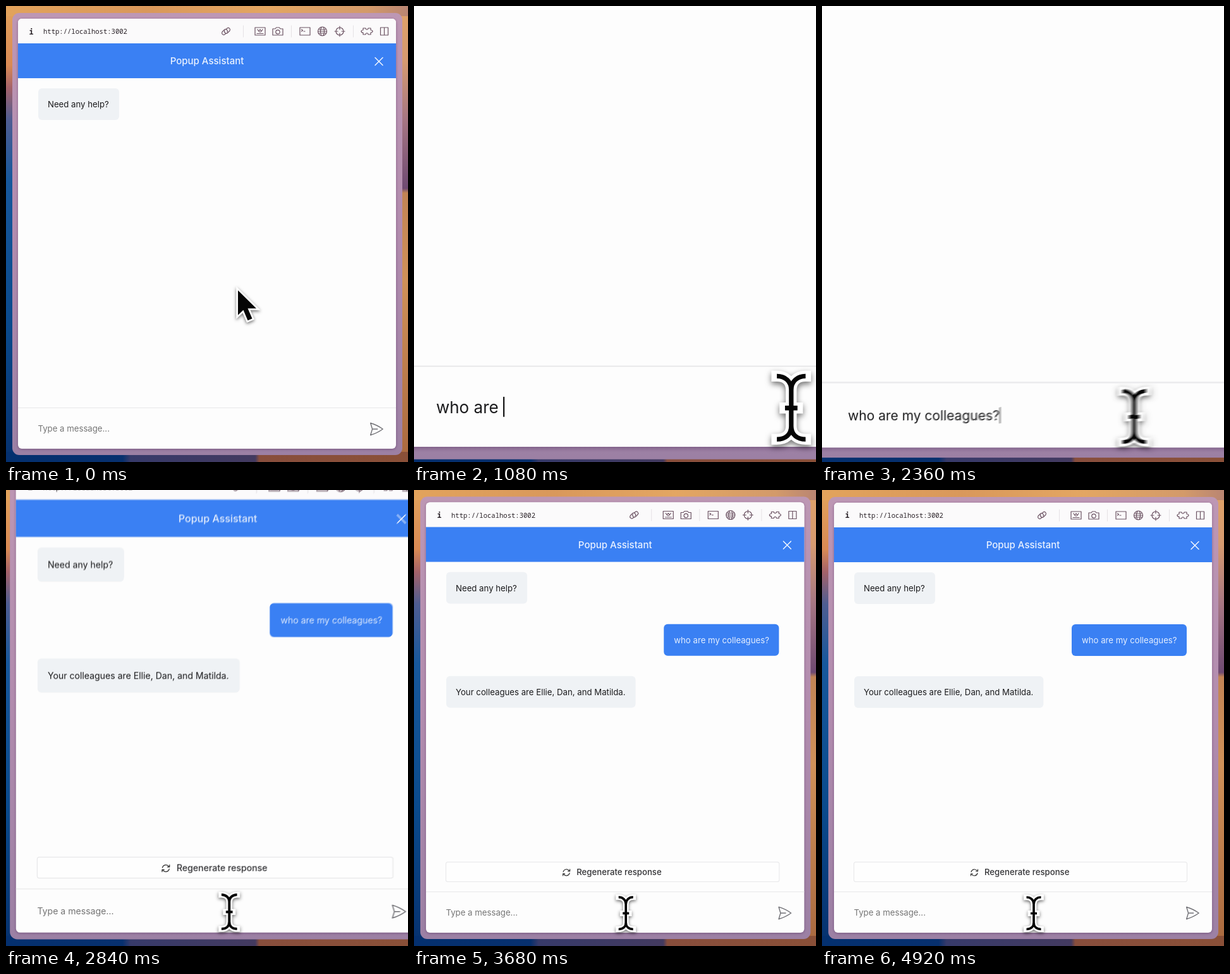
Recreate the animation shown at these times as an HTML page with a canvas. Size 636 by 720 pixels, loop 5 s.

```html
<!DOCTYPE html>
<html lang="en">
<head>
<meta charset="utf-8">
<title>Popup Assistant</title>
<style>
  html, body { margin: 0; width: 100%; height: 100%; overflow: hidden; }
  canvas { display: block; }
</style>
</head>
<body>
<canvas id="stage" width="636" height="720"></canvas>
<script>
const W = 636, H = 720, LOOP = 5000;
const FOCUS = { x: 66.5, y: 702 };
const QUESTION = 'who are my colleagues?';
const ANSWER = 'Your colleagues are Ellie, Dan, and Matilda.';
const SANS = 'Inter, "Open Sans", sans-serif';
const MONO = '"Noto Sans Mono", "DejaVu Sans Mono", monospace';
const BLUE = '#3a80f3', BUBBLE = '#eff2f5', INK = '#1b1b1d', ICON = '#6b5262';

const screen = document.getElementById('stage').getContext('2d');
const buffer = document.createElement('canvas');
buffer.width = W;
buffer.height = H;
const c = buffer.getContext('2d');

// Critically damped spring from 0 to 1.
function spring(t, start, rate) {
  const x = Math.max(0, t - start) / 1000 * rate;
  return 1 - (1 + x) * Math.exp(-x);
}
const zoomAt = t => 1 + spring(t, 156, 6) - spring(t, 2135, 6.19);
const pointerAt = t => {
  const p = spring(t, 0, 7.6);
  return { x: 366 - 31 * p, y: 446 + 222 * p };
};

function rect(x, y, w, h, fill, radius = 0, stroke) {
  c.beginPath();
  c.roundRect(x, y, w, h, radius);
  if (fill) { c.fillStyle = fill; c.fill(); }
  if (stroke) { c.strokeStyle = stroke; c.lineWidth = 1; c.stroke(); }
}
function text(str, x, y, color = INK, font = '13.2px ' + SANS, align = 'left') {
  c.font = font;
  c.fillStyle = color;
  c.textAlign = align;
  c.fillText(str, x, y);
  return c.measureText(str).width;
}
function line(d, x, y, color, width = 1.2, scale = 1) {
  c.save();
  c.translate(x, y);
  c.scale(scale, scale);
  c.lineCap = c.lineJoin = 'round';
  c.strokeStyle = color;
  c.lineWidth = width / scale;
  c.stroke(new Path2D(d));
  c.restore();
}
function gradient(x1, y1, x2, y2, stops) {
  const g = c.createLinearGradient(x1, y1, x2, y2);
  stops.forEach(([at, color]) => g.addColorStop(at, color));
  return g;
}

const wallpaper = {
  left: gradient(0, 0, 0, H, [[0, '#e2a35c'], [.13, '#d98a54'], [.18, '#a4626a'], [.25, '#4f5d92'], [.38, '#17589c'], [.7, '#0a4a8c'], [1, '#06316e']]),
  right: gradient(0, 0, 0, H, [[0, '#dfa267'], [.12, '#d59a70'], [.25, '#a67683'], [.4, '#6f4a72'], [.41, '#c28455'], [.6, '#cf9159'], [1, '#a9693f']]),
  top: gradient(0, 0, W, 0, [[0, '#e2a35c'], [.35, '#d9985b'], [.65, '#e3a662'], [.9, '#d39a6a'], [1, '#b98573']]),
  bottom: gradient(0, 0, W, 0, [[0, '#04306f'], [.29, '#07306e'], [.31, '#373a6a'], [.62, '#433a60'], [.63, '#884e3c'], [1, '#8a5038']])
};
const frameTint = gradient(0, 11, 0, 709, [[0, '#bd97b4'], [.5, '#b28cae'], [1, '#9c80a4']]);

function drawWallpaper() {
  rect(0, 0, 318, H, wallpaper.left);
  rect(318, 0, 318, H, wallpaper.right);
  rect(0, 0, W, 16, wallpaper.top);
  rect(0, 704, W, 16, wallpaper.bottom);
}

function drawToolbar() {
  text('i', 40, 44.5, '#2b2329', 'bold 12px ' + MONO, 'center');
  text('http://localhost:3002', 59, 44.3, '#2b2329', '500 10.56px ' + MONO);
  for (const x of [375.5, 451.5, 549.5]) line('M0 -9V9', x, 40, '#e6e2e5', 1);
  const icons = [
    [348, 'M0 3L-2 5A2.9 2.9 0 0 1 -6 1L-2.5 -2.5A2.9 2.9 0 0 1 2 1M0 -3L2 -5A2.9 2.9 0 0 1 6 -1L2.5 2.5A2.9 2.9 0 0 1 -2 -1'],
    [402, 'M-8 -6H8V6H-8ZM-5 3.5H5M-4 -3L-2 0L0 -3L2 0L4 -3M-1 1H1'],
    [430, 'M-8 -4H-4L-2.5 -6H2.5L4 -4H8V6H-8ZM3.2 1A3.2 3.2 0 1 1 -3.2 1A3.2 3.2 0 1 1 3.2 1'],
    [473, 'M-8 -6H8V6H-8ZM-5.5 -3L-3.5 -1.5L-5.5 0M-2 0H0'],
    [500.5, 'M7 0A7 7 0 1 1 -7 0A7 7 0 1 1 7 0ZM3 0A3 7 0 1 1 -3 0A3 7 0 1 1 3 0ZM-6 -3H6M-7 0H7M-6 3H6'],
    [528, 'M6 0A6 6 0 1 1 -6 0A6 6 0 1 1 6 0ZM0 -8V-3M0 3V8M-8 0H-3M3 0H8'],
    [571, 'M-6 -5H-2C-2 -2 2 -2 2 -5H6V-2C10 -2 10 2 6 2V5H2C2 2 -2 2 -2 5H-6V2C-10 2 -10 -2 -6 -2Z'],
    [598.5, 'M-6 -6H6V6H-6ZM0 -6V6']
  ];
  for (const [x, d] of icons) line(d, x, 40, ICON);
}

function drawChat(t) {
  rect(51, 130, 128, 50, BUBBLE, 6);
  text('Need any help?', 66, 160);
  if (t >= 2440) {
    rect(395, 212, 182, 50, BLUE, 6);
    text(QUESTION, 411, 242, '#e4eeff');
  }
  const shown = ANSWER.slice(0, Math.max(0, Math.floor((t - 2560) / 4.5)));
  if (shown) {
    c.font = '13.2px ' + SANS;
    rect(51, 294, c.measureText(shown).width + 31, 50, BUBBLE, 6);
    text(shown, 66, 324);
  }
  if (t >= 2780) {
    rect(50.5, 587.5, 527, 31, '#fefefe', 3, '#e7e7e9');
    line('M-5 -1A5.2 5.2 0 0 1 4.5 -2.5M5.5 -5V-2H2.5M5 1A5.2 5.2 0 0 1 -4.5 2.5M-5.5 5V2H-2.5', 241, 604, '#333');
    text('Regenerate response', 257, 608, '#333336', '500 13.2px ' + SANS);
  }
}

function drawInput(t) {
  rect(19, 634, 598, 1, '#e8e8ea');
  const typed = QUESTION.slice(0, Math.max(0, Math.floor((t - 560) / 64)));
  if (typed && t < 2440) {
    const width = text(typed, 50.5, 672);
    rect(50.5 + width, 659, 1.1, 16, t < 2330 ? '#111' : '#777');
  } else {
    text('Type a message...', 50.5, 672, '#757575');
  }
  line('M-6 0L-8.7 -8.9A59.8 59.8 0 0 1 9.5 0A59.8 59.8 0 0 1 -8.7 8.9ZM-6 0H1.5', 586, 668, '#707075', 1.4, 1.07);
}

const ARROW = new Path2D('M1 3V42L9.5 34L16.5 50.5L23.5 47.5L16.5 31.5H30Z');
const BEAM = new Path2D('M-11.5 -25C-5 -25 0 -21 0 -14V15C0 22 -5 25.5 -11.5 25.5M11.5 -25C5 -25 0 -21 0 -14M0 15C0 22 5 25.5 11.5 25.5M-5 .5H5');

function drawPointer(time, zoom) {
  const { x, y } = pointerAt(time);
  const beam = y > 645, path = beam ? BEAM : ARROW;
  c.save();
  c.translate(x, y);
  c.lineCap = beam ? 'square' : 'butt';
  c.lineJoin = 'miter';
  // Canvas shadows ignore the transform, so they are scaled here.
  c.shadowColor = 'rgba(0,0,0,.55)';
  c.shadowBlur = 5 * zoom;
  c.shadowOffsetY = 2 * zoom;
  c.strokeStyle = '#fff';
  c.lineWidth = beam ? 8.8 : 5.5;
  c.stroke(path);
  c.shadowColor = 'transparent';
  c.lineCap = 'butt';
  c.fillStyle = c.strokeStyle = '#050505';
  c.lineWidth = 3.7;
  if (beam) c.stroke(path); else c.fill(path);
  c.restore();
}

// Content follows t; camera and pointer follow the shutter time.
function drawScene(t, time) {
  const zoom = zoomAt(time);
  drawWallpaper();
  c.save();
  c.translate(FOCUS.x, FOCUS.y);
  c.scale(zoom, zoom);
  c.translate(-FOCUS.x, -FOCUS.y);
  rect(10, 11, 617, 698, frameTint, 11);
  c.save();
  c.shadowColor = 'rgba(60,20,70,.4)';
  c.shadowBlur = 4 * zoom;
  c.shadowOffsetY = zoom;
  rect(19, 20, 598, 679, '#fdfdfd', 6);
  c.restore();
  rect(19, 20, 598, 39, '#fbfafb', [6, 6, 0, 0]);
  drawToolbar();
  rect(19, 59, 598, 55, BLUE);
  text('Popup Assistant', 318, 92.3, '#e9f1ff', '500 15px ' + SANS, 'center');
  line('M-6 -6L6 6M6 -6L-6 6', 590, 87.5, '#f2f7ff', 1.5);
  drawChat(t);
  drawInput(t);
  drawPointer(time, zoom);
  c.restore();
}

function render(t) {
  const a = pointerAt(t - 6), b = pointerAt(t + 6);
  const moving = Math.abs(zoomAt(t + 6) - zoomAt(t - 6)) > .003 || b.y - a.y > 1;
  const samples = moving ? 8 : 1;
  for (let i = 0; i < samples; i++) {
    drawScene(t, moving ? t - 6 + 12 * i / (samples - 1) : t);
    screen.globalAlpha = 1 / (i + 1);
    screen.drawImage(buffer, 0, 0);
  }
}

const began = performance.now();
function tick() {
  render((performance.now() - began) % LOOP);
  requestAnimationFrame(tick);
}
tick();
</script>
</body>
</html>
```
